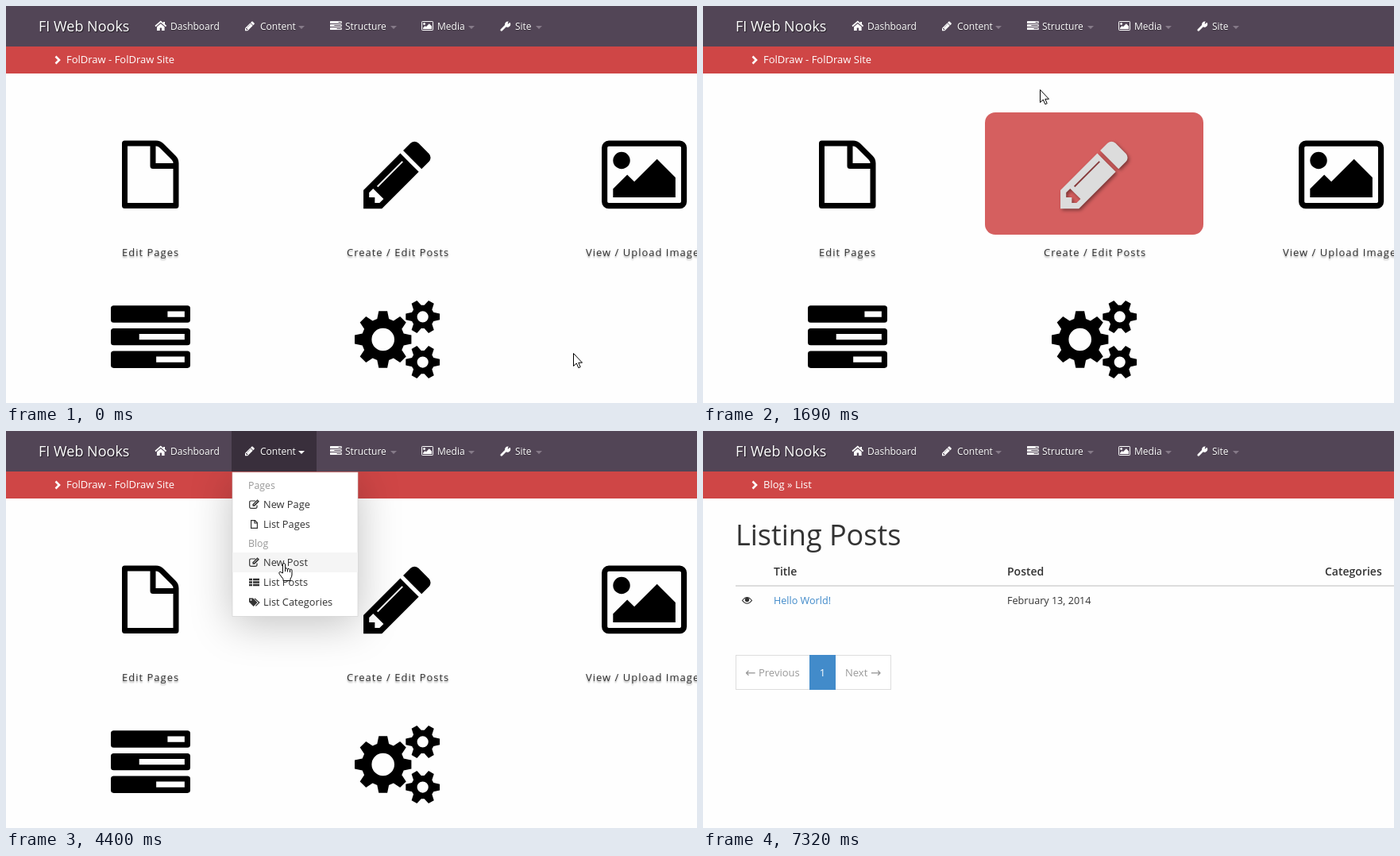
An HTML page that plays this animation: 870x500 px, repeating every 8450 ms.

```html
<!DOCTYPE html>
<html lang="en">
<head>
<meta charset="utf-8">
<title>Site admin</title>
<style>
  html, body { margin: 0; width: 100%; height: 100%; overflow: hidden; background: #fefefe; }
  svg { display: block; width: 870px; height: 500px; font-family: "Open Sans", sans-serif; font-size: 13px; }
  .bar { fill: #fff; }
  .nav { font-size: 12px; text-shadow: 0 1px 1px rgba(0,0,0,.4); }
  .brand { font-size: 18px; text-shadow: 1px 1px 1px rgba(0,0,0,.6); }
  .label { fill: #333; letter-spacing: 1px; text-shadow: 0 2px 2px rgba(0,0,0,.35); }
  .item { fill: #333; font-size: 12.8px; }
  .head { fill: #999; font-size: 12.3px; }
  .box { filter: drop-shadow(0 9px 26px rgba(0,0,0,.24)); }
  .cell { fill: #333; font-size: 12.6px; }
  .th { font-size: 14px; font-weight: 600; }
  .pager { fill: #999; font-size: 13px; }
  .dir { font: 16px "DejaVu Sans", sans-serif; }
  .line { fill: none; stroke: #333; stroke-width: 1.2; }
</style>
</head>
<body>
<svg viewBox="0 0 870 500">
  <defs>
    <path id="pencil" fill-rule="evenodd" d="M960 416l416 416-832 832H128v-416zM491 1536l91-91-235-235-91 91v107h128v128zM998 588l24 24-566 566-24-24zM1643 512q0 53-37 90l-166 166-416-416 166-165q90-76 181 0l235 234q37 39 37 91z"/>
    <g id="image">
      <rect y="192" width="1792" height="1408" rx="96" fill="none" stroke="currentColor" stroke-width="128"/>
      <circle cx="384" cy="576" r="192"/>
      <path d="M1600 960v448H192v-192l320-320 160 160 512-512z"/>
    </g>
    <path id="tasks" fill-rule="evenodd"/>
    <g id="file" fill="none" stroke="#000" stroke-width="7" stroke-linejoin="round">
      <path d="M3.500 3.500H43Q47 3.500 50 6.500L65 21.500Q68 24.500 68 28.500V82H3.500Z"/>
      <path d="M39 4V32H67"/>
    </g>
    <g id="edit">
      <path class="line" d="M10 7.500V9.500Q10 11.300 8 11.300H2.500Q.7 11.300 .7 9.500V4Q.7 2 2.500 2H8"/>
      <path d="M4.500 8.700V6.300L10.500 .3L13 2.800L7 8.700Z"/>
      <path d="M6 7L10.700 2.400" stroke="#fff" stroke-width=".8"/>
    </g>
    <path id="page" class="line" d="M2.600 1.600H7.500L10.400 4.500V11.400H2.600ZM7 2V5H10"/>
    <path id="list" d="M0 3H4M5 3H13M0 6.500H4M5 6.500H13M0 10H4M5 10H13" stroke="#333" stroke-width="2.600"/>
    <g id="tags">
      <path d="M0 1.500H5L10.500 7L5.700 12L0 6.300Z"/>
      <circle cx="2.500" cy="3.800" r="1" fill="#fff"/>
      <path class="line" d="M7 2L12.800 7L8.400 11.400"/>
    </g>
  </defs>

  <g id="home">
    <g id="tiles"></g>
    <use href="#file" x="146" y="169.500"/>
    <use href="#image" transform="translate(753.600 162.400) scale(.0558)"/>
    <use href="#tasks" transform="translate(132 370.200) scale(.0558)"/>
    <text class="label" x="146" y="315">Edit Pages</text>
    <text class="label" x="429" y="315">Create / Edit Posts</text>
    <text class="label" x="730" y="315">View / Upload Images</text>
  </g>

  <g id="blog" class="cell">
    <text x="41" y="144" font-size="36">Listing Posts</text>
    <g class="th">
      <text x="89" y="182">Title</text>
      <text x="383" y="182">Posted</text>
      <text x="783" y="182">Categories</text>
    </g>
    <path d="M41 195H870" stroke="#ddd" stroke-width="2"/>
    <path class="line" d="M49.500 213.500Q55.500 205.500 61.500 213.500Q55.500 221 49.500 213.500Z"/>
    <circle cx="55.500" cy="212.500" r="2.700"/>
    <text x="89" y="218" fill="#428bca">Hello World!</text>
    <text x="383" y="218">February 13, 2014</text>
    <rect x="41.500" y="282.500" width="195" height="43" fill="#fff" stroke="#ddd"/>
    <rect x="134" y="282" width="33" height="44" fill="#428bca"/>
    <g class="pager">
      <text class="dir" x="53" y="310">←</text><text x="70" y="309">Previous</text>
      <text x="179" y="309">Next</text><text class="dir" x="211" y="310">→</text>
      <text x="150.500" y="309" fill="#fff" text-anchor="middle">1</text>
    </g>
  </g>

  <rect y="51" width="870" height="34" fill="#cf4646"/>
  <path d="M62.500 63.500L67 68L62.500 72.500" fill="none" stroke="#fff" stroke-width="2.600"/>
  <text id="crumb" class="bar" x="76" y="72"></text>

  <g id="drop">
    <rect class="box" x="285" y="52" width="158" height="181.500" fill="#fff" stroke="#ccc" stroke-width=".6"/>
    <rect id="hover" x="285" width="158" height="25" fill="#f5f5f5"/>
  </g>

  <rect width="870" height="51" fill="#524556"/>
  <rect id="active" x="284" width="107" height="51" fill="#392f3c"/>
  <text class="bar brand" x="41" y="32">FI Web Nooks</text>
  <g id="nav" class="bar nav" color="#fff">
    <path d="M188 25.500L194.800 19.700L201.600 25.500" fill="none" stroke="#fff" stroke-width="1.700"/>
    <path d="M190 26.200L194.800 22.200L199.600 26.200V31H196V27.500H193.700V31H190ZM198 20h2v4l-2-1.700z"/>
    <use href="#pencil" transform="translate(300 18.200) scale(.0078)"/>
    <use href="#tasks" transform="translate(408 18) scale(.0082 .0078)"/>
    <use href="#image" transform="translate(523.600 18) scale(.0078)"/>
    <path d="M623.800 30.200L630 24" stroke="#fff" stroke-width="2.800" stroke-linecap="round"/>
    <path d="M634.300 21.600A3 3 0 1 1 631.800 20.100L630.900 22.400L632 23.500Z" stroke="#fff" stroke-width="1.200"/>
  </g>

  <g id="cursor" fill="#fff" stroke="#000" stroke-linejoin="round">
    <path id="arrow" d="M.5 .5V16.500L4.300 13L6.800 18.700L9.200 17.700L6.800 12.200H11.500Z"/>
    <g id="hand">
      <path d="M-1.600 13V1.700Q0-1 1.600 1.700V7.500Q3 5.500 4.600 8Q6 6 7.500 8.800Q10 7 10 10V15Q10 18 8 20V22.500H-1V20.500L-5.500 14.500Q-7 12.600-5.500 11.500Q-4.300 11-3 12.300Z"/>
      <path d="M1.600 7.500V11M4.600 8V11.500M7.500 9V12" fill="none"/>
    </g>
  </g>
</svg>
<script>
const LOOP = 8450, FADE = 300;
const OPEN = 2890, CLOSE = 5260, CLICKED = 5370, BLOG = 5940, GONE = 7315;

const $ = id => document.getElementById(id);
const show = (id, on) => { $(id).style.display = on ? '' : 'none'; };
const add = (id, tag, attrs, text = '') => {
  const el = $(id).appendChild(document.createElementNS('http://www.w3.org/2000/svg', tag));
  for (const k in attrs) el.setAttribute(k, attrs[k]);
  el.textContent = text;
  return el;
};

// Three bars, each with a slot starting at a different place
$('tasks').setAttribute('d', [1280, 640, 1024].map((x, i) => {
  const y = 128 + 512 * i;
  return `M64 ${y}H1728q64 0 64 64v256q0 64-64 64H64q-64 0-64-64v-256q0-64 64-64z` +
    `M${x} ${y + 128}H1664v128H${x}z`;
}).join(''));

const carets = {};
[['Dashboard', 207], ['Content', 320, 372], ['Structure', 427, 488], ['Media', 543, 586], ['Site', 641, 671]]
  .forEach(([name, x, mid]) => {
    add('nav', 'text', { x, y: 30 }, name);
    if (mid) carets[name] = add('nav', 'path', { d: `M${mid - 4} 25h8l-4 4z` });
  });

// Menu entries without an icon are headings
const rows = [];
let base = 49, wasItem = false;
for (const [name, icon] of [['Pages'], ['New Page', 'edit'], ['List Pages', 'page'],
  ['Blog'], ['New Post', 'edit'], ['List Posts', 'list'], ['List Categories', 'tags']]) {
  base += icon && wasItem ? 25 : 24;
  wasItem = !!icon;
  if (icon) {
    rows.push(base - 17);
    add('drop', 'use', { href: '#' + icon, x: 306, y: base - 11, fill: '#333' });
  }
  add('drop', 'text', { x: icon ? 324 : 305, y: base, class: icon ? 'item' : 'head' }, name);
}

function gear(cx, cy, teeth, root, tip, half, foot, hole) {
  const pts = [];
  for (let i = 0; i < teeth; i++) {
    const a = i * 2 * Math.PI / teeth, c = Math.cos(a), s = Math.sin(a);
    for (const [r, w] of [[root, -foot], [tip, -half], [tip, half], [root, foot]])
      pts.push(`${cx + r * c - w * s} ${cy + r * s + w * c}`);
  }
  return `M${pts.join('L')}ZM${cx - hole} ${cy}a${hole} ${hole} 0 1 0 ${2 * hole} 0a${hole} ${hole} 0 1 0 ${-2 * hole} 0Z`;
}

function tile(y, enter, leave, attrs) {
  const rect = add('tiles', 'rect', { x: 355, y, width: 275, height: 154, rx: 13, fill: '#cf4646' });
  const wrap = add('tiles', 'g', {});
  const icon = add('tiles', 'path', { 'fill-rule': 'evenodd', ...attrs });
  wrap.append(icon);
  return {
    hovered: t => t >= enter && t < leave,
    draw(t) {
      const rise = Math.min(t - enter, leave - enter, FADE);
      const a = Math.max(0, rise - Math.max(0, t - leave)) / FADE, v = Math.round(255 * a);
      rect.setAttribute('opacity', a);
      icon.setAttribute('fill', `rgb(${v},${v},${v})`);
      wrap.style.filter = a ? `drop-shadow(2px 2px 2px rgba(0,0,0,${a / 2}))` : 'none';
    }
  };
}
const tiles = [
  tile(134, 1058, 1648, {
    d: $('pencil').getAttribute('d'), transform: 'translate(442.900 162.400) scale(.0558)'
  }),
  tile(342, 830, 972, {
    d: gear(474.7, 420, 8, 26, 35.7, 5.4, 7.4, 14.3) +
      [-28.6, 28.6].map(dy => gear(524.7, 420 + dy, 6, 13.6, 21.4, 3.9, 5.6, 7.1)).join('')
  })
];

// Pointer moves: each slows down by its own power and is seen in discrete steps
const home = { x: 714, y: 437 };
const moves = [
  { start: 628, step: 56.4, n: 14, x: 510, y: 202, power: 1.5 },
  { start: 1461, step: 57.14, n: 15, x: 352, y: 23, power: 2.2 },
  { start: 3630, step: 58.5, n: 16, x: 350, y: 193, power: 1 },
  { start: 6430, step: 63.8, n: 13, x: 747, y: 495, power: 1 }
];

function pointer(t) {
  let from = home;
  for (const m of moves) {
    const k = Math.floor((t - m.start) / m.step);
    if (k < 0) break;
    if (k < m.n) {
      const p = 1 - (1 - (k + 0.5) / m.n) ** m.power;
      return {
        x: Math.round(from.x + (m.x - from.x) * p),
        y: Math.round(from.y + (m.y - from.y) * p),
        time: m.start + k * m.step
      };
    }
    from = m;
  }
  return { x: from.x, y: from.y, time: t };
}

function render(t) {
  const { x, y, time } = pointer(t);
  const blog = t >= BLOG, open = t >= OPEN && t < CLOSE;
  const row = rows.find(r => y >= r && y < r + 25);
  const overMenu = row && t >= OPEN && t < CLICKED;
  const hand = y < 53 || overMenu || tiles.some(b => b.hovered(time));

  show('home', !blog);
  show('blog', blog);
  show('drop', open);
  show('active', open);
  show('hover', row);
  if (row) $('hover').setAttribute('y', row);
  for (const name in carets)
    carets[name].setAttribute('fill', open && name === 'Content' ? '#fff' : '#857a88');
  $('crumb').textContent = blog ? 'Blog » List' : 'FolDraw - FolDraw Site';
  tiles.forEach(b => b.draw(time));

  show('cursor', t < GONE);
  show('hand', hand);
  show('arrow', !hand);
  $('cursor').setAttribute('transform', `translate(${x} ${y})`);
}

const start = performance.now();
function frame() {
  render((performance.now() - start) % LOOP);
  requestAnimationFrame(frame);
}
frame();
</script>
</body>
</html>
```
